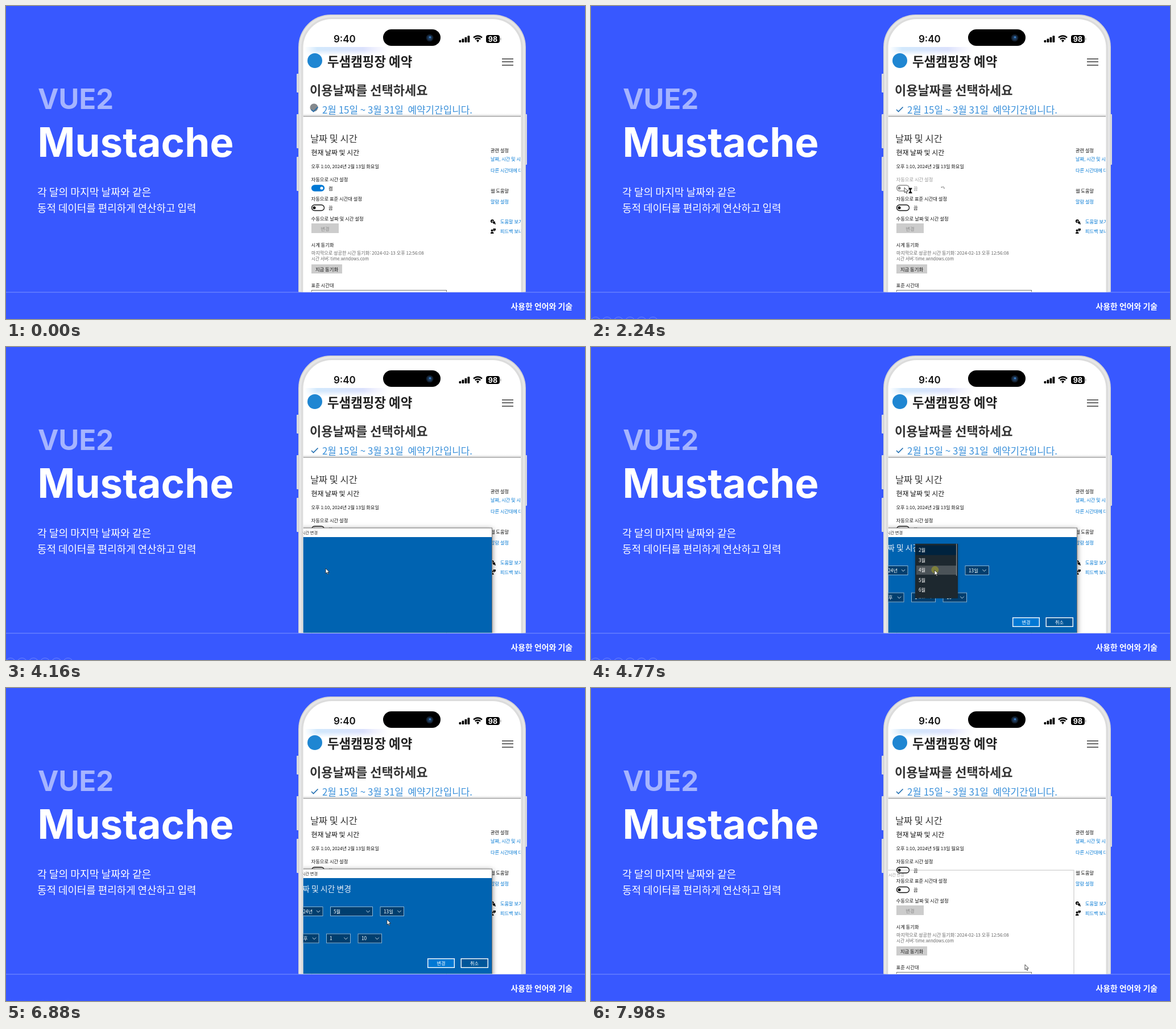
An HTML page with a canvas for the animation above (8 s loop, 1018 by 550 pixels).

```html
<!DOCTYPE html>
<html lang="ko">
<head>
<meta charset="utf-8">
<title>Mustache</title>
<style>
html, body { margin: 0; width: 100%; height: 100%; overflow: hidden; background: #3858ff; }
canvas { display: block; }
</style>
</head>
<body>
<canvas id="stage" width="1018" height="550"></canvas>
<script>
const ctx = document.getElementById('stage').getContext('2d');
const LOOP = 8000;
const KR = '"Noto Sans CJK KR", "Noto Sans CJK JP", "Noto Sans CJK", sans-serif';
const LATIN = 'Inter, sans-serif';
const BLUE = '#3858ff', LINK = '#0078d4', INK = '#111';

const clamp = v => Math.max(0, Math.min(1, v));
const ramp = (t, a, b) => clamp((t - a) / (b - a));
const easeOut = p => 1 - (1 - p) ** 4;
const between = (t, a, b) => t >= a && t < b;

// y is the optical middle of the line
function text(s, x, y, size, color = INK, { weight = 400, align = 'left', font = KR } = {}) {
  ctx.font = `${weight} ${size}px ${font}`;
  ctx.textAlign = align;
  ctx.fillStyle = color;
  ctx.fillText(s, x, y + size * 0.37);
}

function rect(x, y, w, h, fill, stroke, line = 1) {
  if (fill) { ctx.fillStyle = fill; ctx.fillRect(x, y, w, h); }
  if (stroke) {
    ctx.strokeStyle = stroke;
    ctx.lineWidth = line;
    ctx.strokeRect(x + line / 2, y + line / 2, w - line, h - line);
  }
}

function round(x, y, w, h, r, fill, stroke, line = 1) {
  ctx.beginPath();
  ctx.roundRect(x, y, w, h, r);
  if (fill) { ctx.fillStyle = fill; ctx.fill(); }
  if (stroke) { ctx.strokeStyle = stroke; ctx.lineWidth = line; ctx.stroke(); }
}

function dot(x, y, r, fill) {
  ctx.beginPath();
  ctx.arc(x, y, r, 0, 7);
  ctx.fillStyle = fill;
  ctx.fill();
}

function path(points, stroke, line) {
  ctx.beginPath();
  points.forEach(([x, y]) => ctx.lineTo(x, y));
  ctx.strokeStyle = stroke;
  ctx.lineWidth = line;
  ctx.stroke();
}

function withAlpha(a, draw) {
  if (a <= 0) return;
  ctx.save();
  ctx.globalAlpha *= a;
  draw();
  ctx.restore();
}

// Pointer legs: start, end, target x, target y
const LEGS = [
  [30, 820, 716, 389], [1020, 1660, 551, 319], [3440, 3660, 562, 389],
  [4380, 4610, 604, 392], [5380, 5670, 604, 410],
  [6460, 6980, 670, 407], [7200, 7500, 763, 486]
];
const CLICKS = [1890, 3830, 4640, 6020, 7700];

function pointer(t) {
  let x = 541, y = 180;
  for (const [a, b, tx, ty] of LEGS) {
    const p = easeOut(ramp(t, a, b));
    x += (tx - x) * p;
    y += (ty - y) * p;
  }
  return { x, y };
}

function drawSlide(t) {
  rect(0, 0, 1018, 550, BLUE);
  text('VUE2', 56, 162.5, 49, '#a5b4ff', { weight: 700, font: LATIN });
  text('Mustache', 55.5, 238.5, 70.8, '#fff', { weight: 700, font: LATIN });
  text('각 달의 마지막 날짜와 같은', 55, 327.5, 18.2, '#fff');
  text('동적 데이터를 편리하게 연산하고 입력', 55, 355.5, 17.9, '#fff');
  rect(0, 502.5, 1018, 1, 'rgba(255,255,255,.35)');
  text('사용한 언어와 기술', 996, 527.5, 13.9, '#fff', { weight: 900, align: 'right' });
  const shown = ramp(t, 60, 300) * (1 - ramp(t, 6460, 6900));
  withAlpha(shown * 0.25, () => {
    for (let i = 0; i < 6; i++) round(-1 + i * 20.2, 546.5, 18, 18, 9, null, '#fff');
  });
}

function drawPhone() {
  for (const [x, y, h] of [[511, 119, 33], [511, 190, 60], [511, 265, 60], [911, 190, 89]])
    round(x, y, 5, h, 1, '#d9dae0');
  round(514, 15, 400, 600, 57, '#d2d2d4');
  round(515.5, 16.5, 397, 600, 56, '#e7e7e7');
  round(519, 20, 390, 600, 53, '#dcdcdc');
  round(522.5, 23, 383, 600, 50, '#fff');
}

function drawStatus() {
  text('9:40', 576, 58, 17, INK, { weight: 600, font: LATIN });
  round(663, 41, 101, 29, 14.5, '#000');
  dot(745, 56, 6.3, '#14202f');
  dot(745, 56, 4, '#1d3a5c');
  dot(745.5, 55, 1.8, '#3c7fc4');
  for (let i = 0; i < 4; i++) round(796.5 + i * 5, 60 - i * 2.6, 3.8, 4 + i * 2.6, 1, '#000');
  for (const r of [10.5, 6.6]) {
    ctx.beginPath();
    ctx.arc(829.5, 63, r, -2.36, -0.78);
    ctx.strokeStyle = '#000';
    ctx.lineWidth = 2.5;
    ctx.stroke();
  }
  ctx.beginPath();
  ctx.moveTo(829.5, 64);
  ctx.arc(829.5, 63, 3.6, -2.36, -0.78);
  ctx.fillStyle = '#000';
  ctx.fill();
  round(844, 51, 24, 14, 4, '#000');
  rect(869, 56, 1.3, 4, '#999');
  text('98', 856, 58, 12.5, '#fff', { weight: 700, font: LATIN, align: 'center' });
}

function drawHeader(t) {
  const across = ctx.createLinearGradient(525, 0, 672, 0);
  across.addColorStop(0, 'rgba(205,230,252,0)');
  across.addColorStop(0.15, 'rgba(205,230,252,.9)');
  across.addColorStop(0.7, 'rgba(215,222,252,.9)');
  across.addColorStop(1, 'rgba(225,225,252,0)');
  rect(525, 72, 147, 15, across);
  const down = ctx.createLinearGradient(0, 72, 0, 87);
  down.addColorStop(0.35, 'rgba(255,255,255,0)');
  down.addColorStop(1, '#fff');
  rect(525, 72, 147, 15, down);

  dot(543, 96, 13, '#1f86d2');
  text('두샘캠핑장 예약', 565, 97.5, 22.4, '#222', { weight: 900 });
  for (const y of [92, 97, 103]) rect(872, y, 20, 2, '#6a6a6a');
  text('이용날짜를 선택하세요', 534, 148, 22, '#333', { weight: 700 });
  withAlpha(1 - ramp(t, 30, 200), () => dot(541.5, 178.5, 7, '#85898d'));
  path([[537, 182], [540.5, 185.5], [548.5, 177.5]], '#1f6db0', 1.6);
  text('2월 15일 ~ 3월 31일  예약기간입니다.', 556, 182.5, 16.9, '#3a90da', { weight: 300 });
}

function toggle(y, on, color = INK) {
  round(537.5, y - 5, 22, 10, 5, on ? LINK : '#fff', on ? LINK : color, 1.3);
  dot(on ? 555 : 542, y, 2.6, on ? '#fff' : color);
  text(on ? '켬' : '끔', 567, y + 0.5, 8.2, color);
}

function spinner(t) {
  const turn = t / 1000 * 2 * Math.PI;
  for (let i = 0; i < 3; i++) {
    const a = turn - 1.75 - i;
    rect(617.4 + 2.8 * Math.cos(a), 319.9 + 2.8 * Math.sin(a), 1.4, 1.4, '#444');
  }
}

function drawIcons() {
  dot(855, 378, 3.1, INK);
  dot(858, 380.5, 2.8, '#fff');
  dot(858, 380.5, 2.2, INK);
  path([[854, 379], [856, 377]], '#fff', 1);
  rect(859, 382, 2, 1.5, INK);
  dot(854.5, 394.5, 2, INK);
  round(852, 397, 5.5, 3, [2, 2, 0, 0], INK);
  rect(856.5, 391, 4.5, 3.5, INK);
  rect(857.5, 394, 1.5, 1.8, INK);
}

function drawSettings(t) {
  rect(522, 194, 383.5, 309, '#fff');
  const shade = ctx.createLinearGradient(0, 189, 0, 194);
  shade.addColorStop(0, 'rgba(0,0,0,0)');
  shade.addColorStop(1, 'rgba(0,0,0,.14)');
  rect(522, 189, 383.5, 5, shade);
  rect(522, 193.5, 383.5, 1, '#858585');

  const day = t < 7900 ? '2월 13일 화요일' : '5월 13일 월요일';
  const busy = between(t, 1980, 3380);
  const rows = [
    ['현재 날짜 및 시간', 258, 11.9], [`오후 1:10, 2024년 ${day}`, 282, 8.2],
    ['자동으로 표준 시간대 설정', 339, 8.3], ['수동으로 날짜 및 시간 설정', 373.5, 8.4],
    ['시계 동기화', 419.5, 8.3], ['표준 시간대', 491, 8.3]
  ];
  text('날짜 및 시간', 535, 232.5, 16.4, '#333', { weight: 300 });
  for (const [s, y, size] of rows) text(s, 536.5, y, size);
  text('자동으로 시간 설정', 536.5, 304.5, 8.3, busy ? '#999' : INK);
  toggle(320, t < 1980, busy ? '#8a8a8a' : INK);
  toggle(354.5, false);
  if (busy && t > 2150) spinner(t);

  const enabled = between(t, 3380, 3950);
  rect(537, 382, 48, 17, '#ccc', between(t, 3560, 3950) ? '#7a7a7a' : null);
  text('변경', 561, 391.5, 8.2, enabled ? INK : '#8a8a8a', { align: 'center' });
  text('마지막으로 성공한 시간 동기화: 2024-02-13 오후 12:56:08', 537, 434, 8.1, '#666');
  text('시간 서버: time.windows.com', 537, 444, 7.6, '#666');
  rect(537, 454, 54, 16, '#ccc');
  text('지금 동기화', 564, 462.5, 8.3, INK, { align: 'center' });
  rect(537, 499, 238, 20, null, '#777');

  text('관련 설정', 852, 254, 8.2);
  text('날짜, 시간 및 시간 형식', 852, 268.5, 8.2, LINK);
  text('다른 시간대에 대한 시계', 852, 289, 8.2, LINK);
  text('웹 도움말', 852, 325, 8.2);
  text('알람 설정', 852, 343.5, 8.2, LINK);
  text('도움말 보기', 869, 379, 8.2, LINK);
  text('피드백 보내기', 869, 395.5, 8.2, LINK);
  drawIcons();
}

function combo(x, y, w, label, labelX) {
  rect(x, y, w, 17, '#003e6e', '#8db5d6');
  text(label, labelX, y + 8.5, 8.3, '#fff');
  const cx = x + w - 8.5, cy = y + 7;
  path([[cx - 3.2, cy], [cx, cy + 3.2], [cx + 3.2, cy]], '#c9dcea', 1);
}

function drawForm(t) {
  text('날짜 및 시간 변경', 607, 353, 13.9, '#e6eff7', { weight: 300, align: 'right' });
  combo(499, 384, 58.5, '2024년', 513);
  combo(570, 384, 75, t < 6080 ? '2월' : '5월', 576);
  combo(657.5, 384, 42.5, '13일', 664);
  combo(508, 431.5, 42.5, '오후', 515);
  combo(563, 431.5, 43, '1', 569);
  combo(618.5, 431.5, 42.5, '10', 625);
  const hover = t >= 7380;
  rect(741, 475, 48, 17, hover ? '#fff' : LINK, '#fff', 1.4);
  text('변경', 765, 483.5, 8.2, hover ? INK : '#fff', { align: 'center' });
  rect(799.5, 475, 48.5, 17, '#005699', '#fff', 1.4);
  text('취소', 823.5, 483.5, 8.2, '#fff', { align: 'center' });
}

function drawDialog(t) {
  if (t < 3930) return;
  const open = easeOut(ramp(t, 3930, 4130)), close = ramp(t, 7850, 7980);
  const scale = (0.92 + 0.08 * open) * (1 - 0.026 * close);
  ctx.save();
  ctx.translate(643, 400);
  ctx.scale(scale, scale);
  ctx.translate(-643, -400);
  withAlpha(open * (1 - close), () => {
    ctx.save();
    ctx.shadowColor = 'rgba(0,0,0,.5)';
    ctx.shadowBlur = 9;
    ctx.shadowOffsetY = 2;
    rect(430, 318, 425, 240, '#fff');
    ctx.restore();
    rect(430, 334, 424.5, 224, '#0063b1');
    withAlpha(ramp(t, 4300, 4480), () => drawForm(t));
  });
  withAlpha(open * (1 - 0.55 * close), () => {
    rect(430, 317.5, 425, 240, null, '#777');
    text('날짜 및 시간 변경', 548, 326.5, 7.2, '#222', { align: 'right' });
  });
  ctx.restore();
}

function drawMenu(t, mouse) {
  if (!between(t, 4700, 6130)) return;
  const open = easeOut(ramp(t, 4700, 5000));
  const hover = Math.round((mouse.y - 339.5) / 17.55);
  ctx.save();
  ctx.globalAlpha = 1 - ramp(t, 6060, 6130);
  ctx.beginPath();
  ctx.rect(560, 392 - 70 * open, 95, 145 * open);
  ctx.clip();
  ctx.shadowColor = 'rgba(0,0,0,.3)';
  ctx.shadowBlur = 4;
  rect(570, 329, 75, 128.5, '#1d282f');
  ctx.shadowColor = 'transparent';
  for (let i = 0; i < 7; i++) {
    const y = 339.5 + i * 17.55;
    if (i === 1) rect(571, y - 8.5, 71, 17, '#00233f');
    else if (i === hover) rect(572, y - 8, 70.5, 16, '#4b5358');
    text(`${i + 1}월`, i === hover && t >= 6020 ? 577 : 576, y, 8.3, '#fff');
  }
  rect(642, 338, 1.2, 64, '#8b9195');
  ctx.restore();
}

function drawHourglass(x, y) {
  rect(x, y, 6, 1.5, '#000');
  rect(x, y + 8, 6, 1.5, '#000');
  ctx.beginPath();
  for (const [px, py] of [[0.5, 1], [5.5, 1], [3.7, 4.7], [5.5, 8.5], [0.5, 8.5], [2.3, 4.7]])
    ctx.lineTo(x + px, y + py);
  ctx.fill();
}

function drawPointer(t, { x, y }) {
  for (const at of CLICKS)
    if (between(t, at, at + 200))
      withAlpha(0.75 * (1 - ramp(t, at + 40, at + 200)), () => dot(x + 0.8, y - 0.5, 6.5, '#e8e000'));
  if (t < 30) return;
  ctx.beginPath();
  for (const [px, py] of [[0, 0], [0, 9], [2.1, 7.2], [3.7, 10.4], [5, 9.8], [3.5, 6.7], [6.4, 6.5]])
    ctx.lineTo(x + px, y + py);
  ctx.closePath();
  ctx.fillStyle = '#fff';
  ctx.fill();
  ctx.strokeStyle = '#222';
  ctx.lineWidth = 0.8;
  ctx.stroke();
  if (between(t, 2000, 3400)) drawHourglass(x + 7.5, y + 0.7);
}

function clipTo(x, y, w, h) {
  ctx.beginPath();
  ctx.rect(x, y, w, h);
  ctx.clip();
}

function draw(t) {
  const mouse = pointer(t);
  drawSlide(t);
  ctx.save();
  clipTo(0, 0, 1018, 502.5);
  drawPhone();
  drawStatus();
  clipTo(522.7, 0, 382.5, 502.5);
  drawHeader(t);
  drawSettings(t);
  drawDialog(t);
  drawMenu(t, mouse);
  drawPointer(t, mouse);
  ctx.restore();
}

const start = performance.now();
function tick() {
  draw((performance.now() - start) % LOOP);
  requestAnimationFrame(tick);
}
tick();
</script>
</body>
</html>
```
